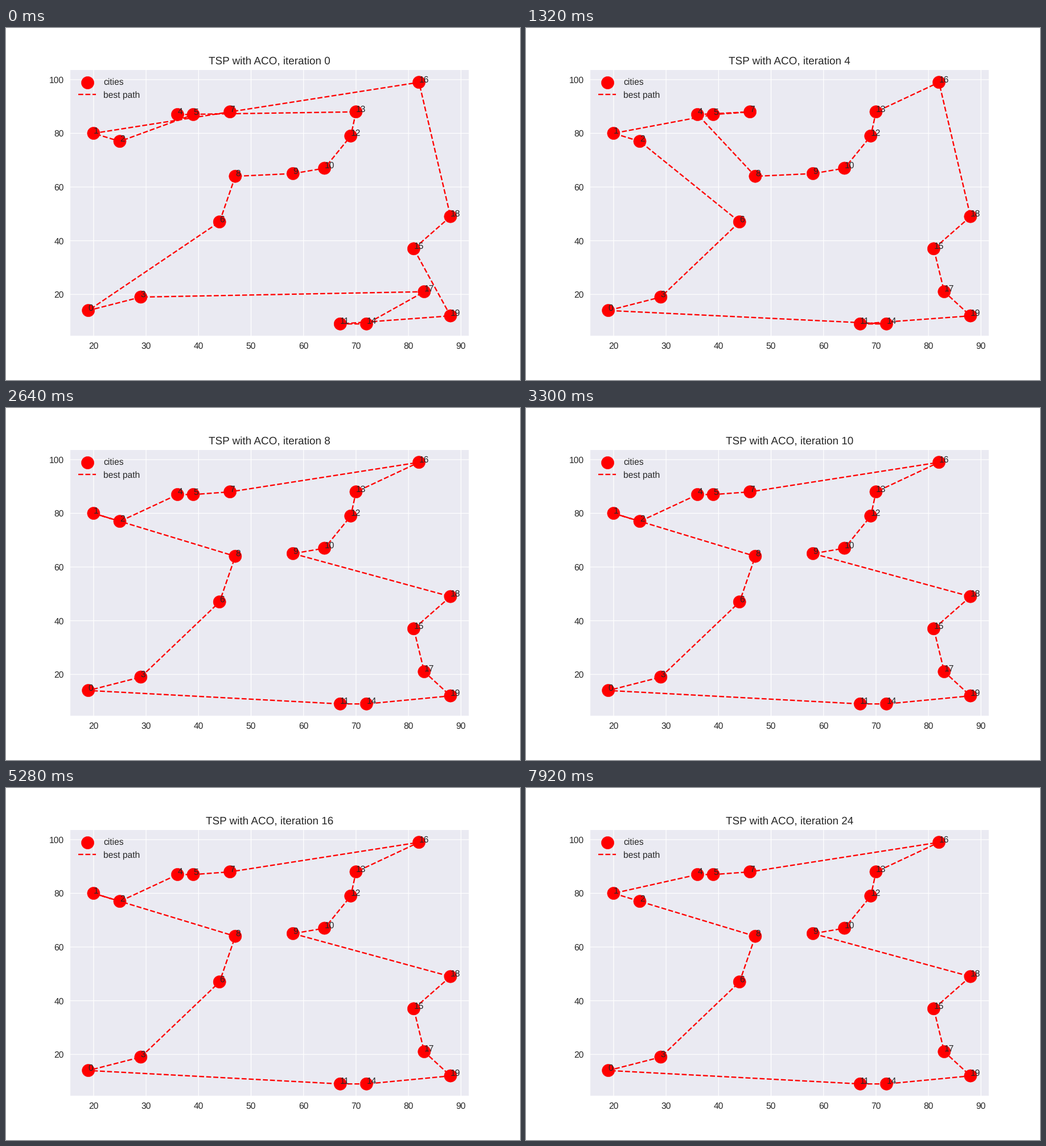
Recreate the animation shown at these times as a matplotlib script. Size 903x620 px, loop 8 s.

```python
import math

import matplotlib.pyplot as plt
from matplotlib.animation import FuncAnimation

WIDTH, HEIGHT = 903, 620
DPI = WIDTH / 8
LOOP_MS = 8000
STEP_MS = 20
ITERATION_MS = 330
INK = "0.15"
START = 11

plt.rcParams.update({
    "font.family": "Liberation Sans",
    "font.size": 10,
    "text.color": INK,
    "text.hinting": "none",
})

# City coordinates, numbered from left to right
CITIES = [
    (19, 14), (20, 80), (25, 77), (29, 19), (36, 87),
    (39, 87), (44, 47), (46, 88), (47, 64), (58, 65),
    (64, 67), (67, 9), (69, 79), (70, 88), (72, 9),
    (81, 37), (82, 99), (83, 21), (88, 49), (88, 12),
]

# Steps where the best ant strays from the nearest city, by iteration of discovery
DETOURS = {
    0: {14: 17, 17: 3, 13: 4, 5: 2},
    1: {10: 12, 16: 2, 1: 5, 9: 0},
    4: {11: 19, 18: 16, 8: 4, 4: 7, 5: 1},
    8: {18: 9},
    18: {18: 9, 4: 1},
}


def walk(detours):
    """Closed tour to the nearest unvisited city, except where a detour is taken."""
    tour = [START]
    left = set(range(len(CITIES))) - {START}
    while left:
        here = tour[-1]
        nearest = min(left, key=lambda c: (math.dist(CITIES[here], CITIES[c]), -c))
        tour.append(detours.get(here, nearest))
        left.remove(tour[-1])
    return list(zip(*(CITIES[c] for c in tour + [START])))


PATHS = {found: walk(detours) for found, detours in DETOURS.items()}


def style_axes(ax):
    ax.set_facecolor("#EAEAF2")
    ax.set_xlim(15.55, 91.45)
    ax.set_ylim(4.5, 103.5)
    ax.set_xticks(range(20, 91, 10))
    ax.set_yticks(range(20, 101, 20))
    ax.tick_params(length=0, pad=7, labelsize=10, labelcolor=INK)
    ax.set_axisbelow(True)
    ax.grid(color="white", linewidth=0.8, linestyle="-", snap=False)
    for spine in ax.spines.values():
        spine.set_visible(False)


fig = plt.figure(figsize=(8, (HEIGHT + 1e-6) / DPI), dpi=DPI, facecolor="white")
ax = fig.add_axes([0.125, 0.125, 0.775, 0.755])
style_axes(ax)

# One size per city keeps the dots off the pixel grid
dots = ax.scatter(*zip(*CITIES), s=[200] * len(CITIES), c="red",
                  linewidths=0.3, label="cities")
path, = ax.plot([], [], "--", color="red", linewidth=1.5, label="best path")
for number, (x, y) in enumerate(CITIES):
    ax.text(x, y, str(number))

title = ax.set_title("", fontsize=12, pad=6)
ax.legend(handles=[dots, path], loc="upper left", frameon=False,
          scatterpoints=1, fontsize=10)


def update(frame):
    iteration = (frame * STEP_MS + STEP_MS // 2) // ITERATION_MS
    path.set_data(*PATHS[max(found for found in PATHS if found <= iteration)])
    title.set_text(f"TSP with ACO, iteration {iteration}")
    return path, title


anim = FuncAnimation(fig, update, frames=LOOP_MS // STEP_MS, interval=STEP_MS,
                     init_func=lambda: update(0), repeat=True, repeat_delay=0)
plt.show()
```
